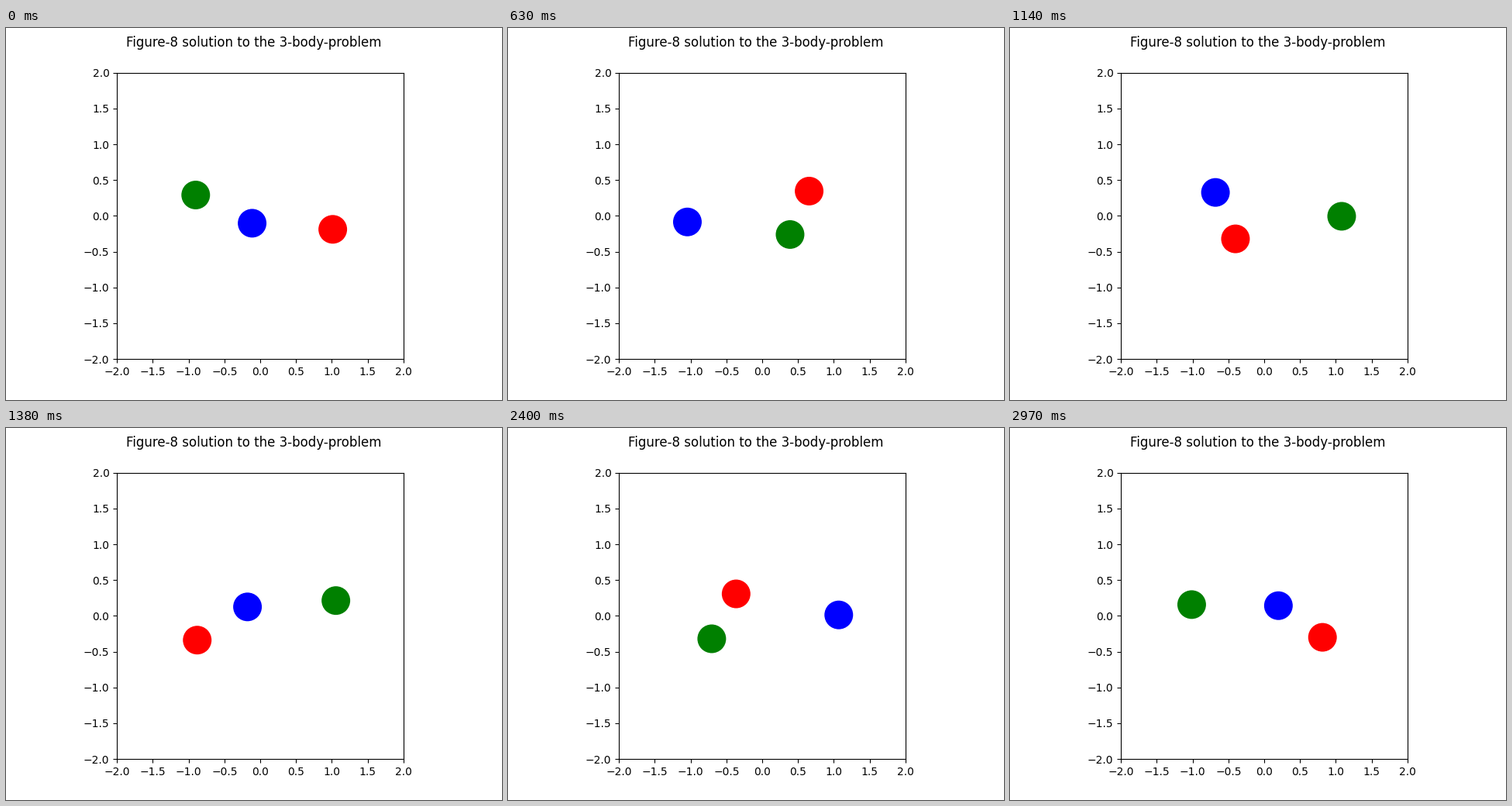
A matplotlib script for the animation above (3000 ms loop, 640x480 px).

```python
import numpy as np
import matplotlib.pyplot as plt
from matplotlib.animation import FuncAnimation

FRAMES = 100
INTERVAL = 30      # ms
DT = 0.06          # simulated time per frame
LEAD = 2           # steps already taken when the loop starts
COLORS = ("r", "g", "b")


def accelerations(pos):
    """Mutual gravity of unit masses with G = 1."""
    gap = pos[None, :, :] - pos[:, None, :]
    dist = np.linalg.norm(gap, axis=2)
    np.fill_diagonal(dist, 1.0)
    return (gap / dist[:, :, None] ** 3).sum(axis=1)


def simulate(steps):
    """Semi-implicit Euler integration of the figure-8 orbit."""
    start = np.array([0.97000436, -0.24308753])
    vel_mid = np.array([-0.93240737, -0.86473146])
    pos = np.array([start, -start, [0.0, 0.0]])
    vel = np.array([-vel_mid / 2, -vel_mid / 2, vel_mid])
    path = [pos]
    for _ in range(steps):
        vel = vel + DT * accelerations(pos)
        pos = pos + DT * vel
        path.append(pos)
    return np.array(path)


path = simulate(FRAMES + LEAD)

fig, ax = plt.subplots(figsize=(6.4, 4.8), dpi=100)
fig.suptitle("Figure-8 solution to the 3-body-problem")
ax.set_aspect("equal")
ax.set_xlim(-2, 2)
ax.set_ylim(-2, 2)

bodies = [ax.add_patch(plt.Circle(p, 0.2, fc=c))
          for p, c in zip(path[LEAD], COLORS)]


def update(frame):
    for body, center in zip(bodies, path[frame + LEAD]):
        body.center = center
    return bodies


anim = FuncAnimation(fig, update, frames=FRAMES, interval=INTERVAL,
                     repeat=True, repeat_delay=0)
plt.show()
```
